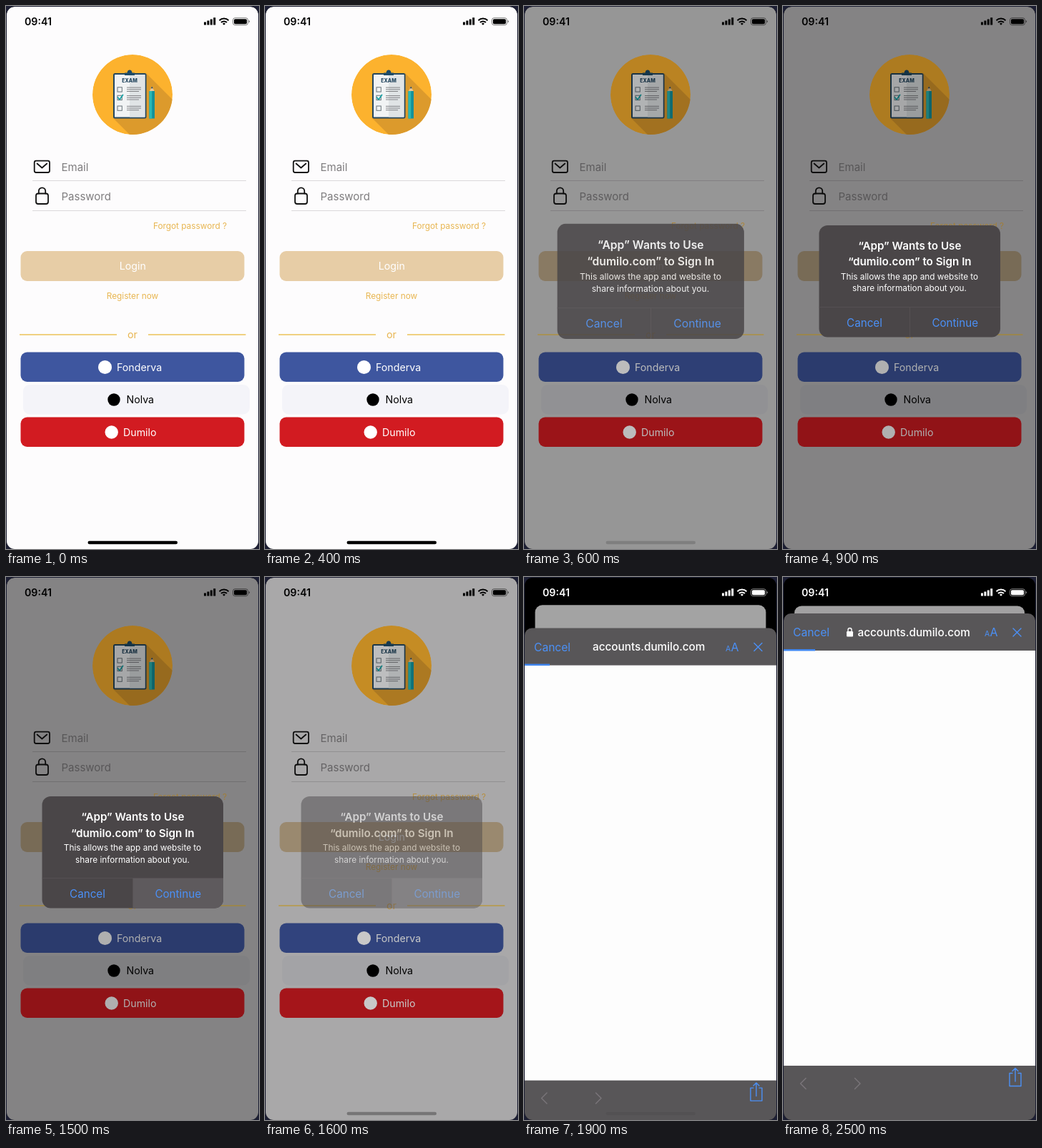
These frames come from a looping animation (354x760 px, 2600 ms). An HTML page:

```html
<!DOCTYPE html>
<html lang="en">
<head>
<meta charset="utf-8">
<title>Sign in</title>
<style>
  html, body { margin: 0; width: 100%; height: 100%; overflow: hidden; background: #1c1e33; }
  svg { display: block; width: 354px; height: 760px; font-family: Inter, "Open Sans", sans-serif; }
  .mid { text-anchor: middle; }
  .line { fill: none; stroke-linecap: round; stroke-linejoin: round; }
</style>
</head>
<body>
<svg viewBox="0 0 354 760">
  <defs>
    <clipPath id="screen"><rect x="1" y="1" width="352" height="759" rx="11"/></clipPath>
    <clipPath id="disc"><circle cx="177" cy="124" r="56"/></clipPath>
    <clipPath id="panel"><rect x="50.5" y="307" width="253.5" height="156.5" rx="12"/></clipPath>
  </defs>

  <g clip-path="url(#screen)">
    <rect width="354" height="760" fill="#000"/>

    <g id="card">
      <g id="back">
        <rect x="1" y="1" width="352" height="770" rx="11" fill="#fdfcfd"/>
        <rect x="20.5" y="343" width="313" height="42" rx="9" fill="#e7cda6"/>
        <rect x="24" y="530" width="317" height="41.5" rx="9" fill="#f4f4f9"/>
        <path d="M37 244.5H336M37 286.5H336" stroke="#dad8da"/>
      </g>

      <g id="front">
        <g clip-path="url(#disc)">
          <circle cx="177" cy="124" r="56" fill="#fcb22e"/>
          <path d="M196 94L262 160L215 222L150 157Z" fill="#dc9a2c"/>
        </g>
        <rect x="151" y="95" width="44.5" height="61.5" rx="1.5" fill="#f1f3f4" stroke="#24475f" stroke-width="2"/>
        <path d="M173 96H194.5V155.5H173Z" fill="#e0e4e6"/>
        <path d="M166 97V93.5H169.5Q170 89.5 173 89.5T176.500 93.5H180V97Z" fill="#1d4a66"/>
        <text class="mid" x="173" y="107" font-size="7" font-weight="800" fill="#24475f">EXAM</text>
        <g id="rows"></g>
        <path class="line" d="M156.500 128L159 131L163.500 124.500" stroke="#17a3a5" stroke-width="1.800"/>
        <path d="M200.500 120L204.200 112.500L208 120Z" fill="#e8c79a"/>
        <path d="M202.800 115.300L204.200 112.500L205.700 115.300Z" fill="#24475f"/>
        <path d="M200.500 119H208V157.500H200.500Z" fill="#14919a"/>
        <path d="M200.500 119H204.200V157.500H200.500Z" fill="#2ab8b4"/>

        <g class="line" stroke="#111" stroke-width="1.800">
          <rect x="39.700" y="216.700" width="21.300" height="16.300" rx="2.500"/>
          <path d="M43.500 220.500L50.400 226.500L57.300 220.500"/>
          <rect x="42" y="262.500" width="17" height="14.500" rx="3"/>
          <path d="M45.800 262.500V259A4.700 4.700 0 0 1 55.200 259V262.500"/>
        </g>
        <g font-size="15" fill="#7f7d7f">
          <text x="77.500" y="230.500">Email</text>
          <text x="77.500" y="271.500">Password</text>
        </g>
        <g class="mid" fill="#e8b651" font-size="11.800">
          <text x="257.500" y="311.500">Forgot password ?</text>
          <text x="177" y="409.500">Register now</text>
          <text x="177" y="465" font-size="14.300">or</text>
        </g>
        <path d="M19 460H155M199 460H335.500" stroke="#ebc458" stroke-width="1.600"/>

        <rect x="20.500" y="484.500" width="313" height="41.500" rx="9" fill="#3e569f"/>
        <rect x="20.500" y="575.500" width="313" height="41.500" rx="9" fill="#d21b21"/>
        <circle cx="138.500" cy="505.500" r="9.500" fill="#fff"/>
        <circle cx="151" cy="551" r="8.700" fill="#000"/>
        <circle cx="147.700" cy="596.500" r="9.200" fill="#fff"/>
        <g font-size="14.200" fill="#fff">
          <text class="mid" x="177.300" y="369">Login</text>
          <text x="155" y="510.500">Fonderva</text>
          <text x="168.500" y="556" fill="#000">Nolva</text>
          <text x="164" y="601.500">Dumilo</text>
        </g>
      </g>
    </g>

    <g id="status">
      <text x="26" y="26.700" font-size="14.200" font-weight="600">09:41</text>
      <path d="M277 22.500h3v4h-3zM281.400 20.500h3v6h-3zM285.800 18.500h3v8h-3zM290.200 16.200h3v10.300h-3z"/>
      <g fill="none" stroke="currentColor" stroke-width="2">
        <path d="M298.500 20.200A9.300 9.300 0 0 1 311.500 20.200M301 23A5.800 5.800 0 0 1 309 23"/>
        <rect x="317.500" y="16.700" width="21" height="10" rx="3" stroke-width="1" stroke-opacity=".5"/>
      </g>
      <path d="M303 24.700Q305 23 307 24.700L305 26.800Z"/>
      <rect x="319" y="18.200" width="18" height="7" rx="1.700"/>
      <path d="M339.800 19.800Q342.500 21.700 339.800 23.600Z" opacity=".6"/>
    </g>

    <g id="alert">
      <g clip-path="url(#panel)">
        <rect x="50" y="307" width="255" height="157" fill="#4a4648"/>
        <rect id="press" x="177.500" y="421.500" width="127" height="43" fill="#5e5a5d"/>
        <path d="M50 421.500H305M177.500 421.500V464" stroke="#575255" stroke-width=".8"/>
      </g>
      <g class="mid" fill="#fff">
        <g font-size="15.200" font-weight="600">
          <text x="177.300" y="341">“App” Wants to Use</text>
          <text x="177.300" y="363.500">“dumilo.com” to Sign In</text>
        </g>
        <g font-size="11.800">
          <text x="177" y="383">This allows the app and website to</text>
          <text x="177" y="399.500">share information about you.</text>
        </g>
        <g font-size="15.200" fill="#4b90f6">
          <text x="114" y="448.500">Cancel</text>
          <text x="240.700" y="448.500">Continue</text>
        </g>
      </g>
    </g>

    <g id="sheet">
      <rect id="bar" x="1" width="352" height="800" rx="10" fill="#585658"/>
      <rect id="web" x="1" y="52" width="352" height="581"/>
      <rect id="load" x="1" y="50" height="2.500" fill="#3f86f0"/>
      <g fill="#4b90f6">
        <text x="14" y="32" font-size="15.600">Cancel</text>
        <text x="282" y="32" font-size="10.500">A</text>
        <text x="289.500" y="32" font-size="16">A</text>
      </g>
      <text id="host" y="31.700" font-size="15.300" font-weight="500" fill="#fff">accounts.dumilo.com</text>
      <g id="lock">
        <rect x="89" y="25" width="9" height="7.500" rx="1.300" fill="#fff"/>
        <path class="line" d="M91 25V23A2.500 2.500 0 0 1 96 23V25" stroke="#fff" stroke-width="1.400"/>
      </g>
      <g class="line" stroke="#4b90f6" stroke-width="1.400">
        <path id="reload" d="M328 20.500A6 6 0 1 0 333.700 26.500M326 17.500L329 20.500L326 23.500"/>
        <path id="stop" d="M322 21L333 32M333 21L322 32"/>
        <path d="M321 643.500H317V661.500H333V643.500H329M325 655V636.500M321 640.500L325 636.500L329 640.500"/>
        <path d="M32 650.500L24.500 658L32 665.500M100.500 650.500L108 658L100.500 665.500" stroke="#7a767a"/>
      </g>
    </g>

    <rect id="home" x="114.500" y="748.700" width="125.500" height="4.600" rx="2.300" fill="#000"/>
  </g>
</svg>
<script>
const LOOP = 2600, STEP = 100;
const $ = id => document.getElementById(id);
const clamp = v => Math.max(0, Math.min(1, v));
const mix = (a, b, p) => a + (b - a) * p;

// Critically damped spring from 0 to 1
const spring = (t, start) => {
  const x = Math.max(0, t - start) * 0.0186;
  return 1 - (1 + x) * Math.exp(-x);
};
const show = (id, on) => $(id).setAttribute("opacity", on ? 1 : 0);

$("rows").innerHTML = [113.8, 125.3, 140].map(y => `
  <rect x="156" y="${y}" width="6.3" height="6.3" fill="none" stroke="#68737a"/>
  <path d="M169 ${y + .3}H189M169 ${y + 3}H189M169 ${y + 5.7}H186" stroke="#77787b" stroke-width=".9"/>`).join("");

function loaded(t) {
  if (t < 1800) return 3;
  if (t < 1900) return 20;
  return t < 2500 ? 35 : 44;
}

function draw(t) {
  const open = spring(t, 421), close = spring(t, 1540), rise = spring(t, 1610);
  const dim = 0.48 * open * (1 - close) + 0.36 * rise;

  const k = 1 - 0.085 * rise;
  $("card").setAttribute("transform", `translate(${177 * (1 - k)} ${39.5 * rise}) scale(${k})`);
  $("back").style.filter = `brightness(${1 - dim})`;
  $("front").style.filter = `brightness(${1 - 0.65 * dim})`;

  const zoom = 1.2 - 0.2 * open;
  $("alert").setAttribute("transform", `translate(177 385) scale(${zoom}) translate(-177 -385)`);
  $("alert").setAttribute("opacity", open * (1 - close) ** 2);
  show("press", t >= 1400);

  const ink = Math.round(255 * clamp((rise - 0.6) / 0.3));
  const tone = `rgb(${ink},${ink},${ink})`;
  $("status").setAttribute("fill", tone);
  $("status").setAttribute("color", tone);

  const secure = t >= 2500, busy = t < 1800;
  $("sheet").setAttribute("transform", `translate(0 ${mix(760, 51, rise)})`);
  const p = clamp(rise * 2 - 1);
  $("web").setAttribute("fill", `rgb(${mix(248, 253, p)},${mix(246, 253, p)},${mix(252, 253, p)})`);
  $("load").setAttribute("width", loaded(t));
  $("host").setAttribute("x", secure ? 104.5 : 96);
  show("lock", secure);
  show("reload", busy);
  show("stop", !busy);

  $("home").setAttribute("opacity", clamp(1 - open + close) * (1 - rise * rise));
}

function tick() {
  const t = performance.now() % LOOP;
  draw(Math.floor(t / STEP) * STEP);
  requestAnimationFrame(tick);
}
tick();
</script>
</body>
</html>
```
